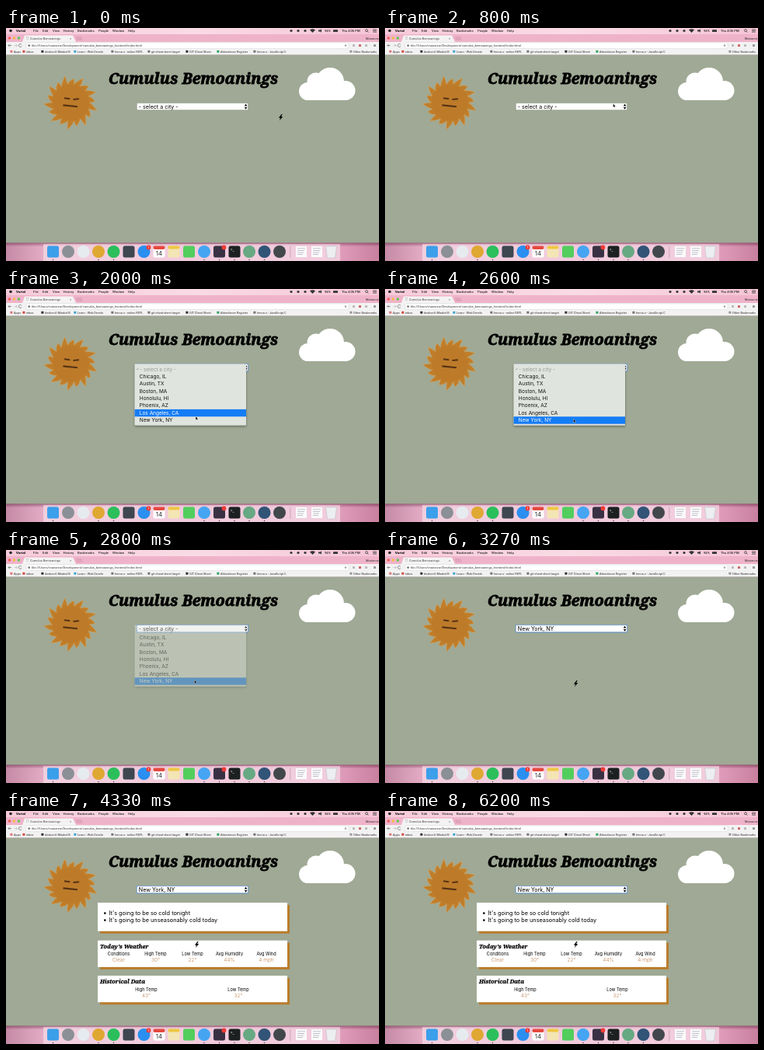
An HTML page for the animation above (6390 ms loop, 480 by 300 pixels).

```html
<!DOCTYPE html>
<html lang="en">
<head>
<meta charset="utf-8">
<title>Cumulus Bemoanings</title>
<style>
html, body { margin: 0; width: 100%; height: 100%; overflow: hidden; background: #9fa995; }
svg { display: block; width: 100vw; height: 100vh; }
text { font-family: Inter, "Open Sans", sans-serif; white-space: pre; }
.ui { font-family: Roboto, "Liberation Sans", sans-serif; }
.show { font-family: "Noto Serif", "DejaVu Serif", serif; font-weight: 900; font-style: italic; stroke: #000; }
</style>
</head>
<body>
<svg id="stage" viewBox="0 0 480 300">
  <defs>
    <linearGradient id="sky">
      <stop offset="0" stop-color="#c58aa5"/><stop offset=".12" stop-color="#e9b3ca"/>
      <stop offset=".5" stop-color="#e5a3c1"/><stop offset=".85" stop-color="#e9a9c6"/>
      <stop offset="1" stop-color="#c9809f"/>
    </linearGradient>
    <linearGradient id="bar">
      <stop offset="0" stop-color="#f6cad9"/><stop offset=".5" stop-color="#f9dbe5"/>
      <stop offset="1" stop-color="#f5c5d6"/>
    </linearGradient>
    <linearGradient id="shade" x2="0" y2="1">
      <stop offset="0" stop-color="#402" stop-opacity=".4"/><stop offset="1" stop-color="#402" stop-opacity="0"/>
    </linearGradient>
    <filter id="soft" x="-10%" y="-10%" width="120%" height="125%">
      <feDropShadow dx="0" dy="1.5" stdDeviation="1.6" flood-opacity=".4"/>
    </filter>
  </defs>
  <rect width="480" height="300" fill="url(#sky)"/>
  <g id="browser"></g>
  <g id="page"></g>
  <g id="dock"></g>
  <g id="cards"></g>
  <g id="select">
    <rect id="ring" x="167.6" y="96" width="144.6" height="10.4" rx="1.6" fill="#5b95dc"/>
    <rect x="168.5" y="96.8" width="142.8" height="8.8" rx="1" fill="#fff" stroke="#7d8579" stroke-width=".3"/>
    <text id="choice" x="170.8" y="103.8" font-size="7.1"></text>
    <path d="M306.8 100.5L308.6 97.7L310.4 100.5ZM306.8 102L308.6 104.8L310.4 102Z"/>
  </g>
  <g id="menu"></g>
  <path id="bolt" d="M.9-4L-2.6.7H-.4L-1.5 4.2L2.7-1H.5L2.2-4Z"/>
  <path id="arrow" d="M0 0V4.4L1.1 3.5L1.9 5L2.7 4.6L2 3.2H3.3Z" stroke="#fff" stroke-width=".35"/>
</svg>
<script>
const $ = id => document.getElementById(id);
const put = (id, ...parts) => $(id).insertAdjacentHTML('beforeend', parts.flat().join(''));
const rect = (x, y, w, h, fill, more = '') =>
  `<rect x="${x}" y="${y}" width="${w}" height="${h}" fill="${fill}" ${more}/>`;
const circle = (x, y, r, fill) => `<circle cx="${x}" cy="${y}" r="${r}" fill="${fill}"/>`;
const text = (x, y, size, str, more = '') => `<text x="${x}" y="${y}" font-size="${size}" ${more}>${str}</text>`;
const mid = 'text-anchor="middle"';
const ui = (x, y, size, str, more = '') => text(x, y, size, str, 'class="ui" ' + more);

// Menu bar, tabs, address and bookmarks
put('browser',
  rect(0, 0, 480, 8, 'url(#bar)'),
  circle(6, 3.5, 1.8, '#222'),
  ui(13, 4.9, 4.4, 'Vortal', 'font-weight="700"'),
  [[35, 'File'], [47, 'Edit'], [60, 'View'], [73.5, 'History'], [92, 'Bookmarks'], [119, 'People'], [137, 'Window'], [157, 'Help']]
    .map(([x, s]) => ui(x, 4.9, 4.3, s)),
  [367, 376, 385].map(x => circle(x, 3.5, 1.6, '#333')),
  '<path d="M391 2.6Q394.5-.2 398 2.6L394.5 6ZM402 2.6H405L406 1V6L405 4.6H402Z" fill="#333"/>',
  ui(410, 4.9, 4.2, '94%'),
  rect(421, 2.2, 6, 2.8, '#333', 'rx=".6"'),
  ui(432, 4.9, 4.2, 'Thu 4:06 PM'),
  '<g fill="none" stroke="#333" stroke-width=".7"><circle cx="464" cy="3.2" r="1.5"/><path d="M465.1 4.3L466.4 5.7M472 2H477M472 3.6H477M472 5.2H477"/></g>',
  rect(0, 8, 480, 10, '#efb3c9'),
  ['#f25e57', '#f5bd3f', '#5ac951'].map((c, i) => circle(4.5 + i * 6, 13, 1.7, c)),
  '<path d="M21 18L24 9.5H86L90 18Z" fill="#f4f3f4"/><path d="M91 16L89.5 11H97L99 16Z" fill="#e0a4ba"/>',
  rect(26.2, 11.2, 2.6, 3.4, '#fff', 'stroke="#999" stroke-width=".4"'),
  ui(31, 14.7, 4, 'Cumulus Bemoanings', 'fill="#444"'),
  ui(82, 14.7, 4.2, '×', 'fill="#555"'),
  ui(463, 14.7, 4, 'Marianne', 'fill="#333"'),
  rect(0, 18, 480, 16.6, '#f3f2f3'),
  rect(26, 18.9, 415, 7.4, '#fff', 'rx="1" stroke="#ccc" stroke-width=".4"'),
  '<g fill="none" stroke="#666" stroke-width=".7"><path d="M7 22.5H3M4.7 20.8L3 22.5L4.7 24.2M20 21.2A2 2 0 1 0 20.2 23.3"/><path d="M10.5 22.5H14.5M12.8 20.8L14.5 22.5L12.8 24.2" stroke="#bbb"/></g>',
  circle(29.7, 22.6, 1.4, '#777'),
  ui(33, 24.1, 4, 'file:///Users/marianne/Development/cumulus_bemoanings_frontend/index.html', 'fill="#333"'),
  circle(437, 22.6, 1.3, '#aaa'),
  [[446, '#bbb'], [454, '#c66'], [462, '#bbb'], [473, '#999']].map(([x, c]) => rect(x, 21, 3, 3, c, 'rx=".6"')),
  [[10, 'Apps', '#d77'], [26, 'inbox', '#d54a3f'], [50, 'deskcntl: Mirabel B', '#333'], [92, 'Learn - Web Develo', '#3ba6d0'],
   [140, 'fenno.x - online REPL', '#777'], [187, 'git-cheat-sheet target', '#777'], [236, 'GIT Cheat Sheet', '#333'],
   [276, 'Attendance Register', '#35a463'], [323, 'fenno.x - JavaScript C', '#777'], [447, 'Other Bookmarks', '#999']]
    .map(([x, s, c]) => rect(x - 4.6, 28.8, 3, 3, c, 'rx=".5"') + ui(x, 31.9, 3.9, s, 'fill="#333"')),
  rect(0, 34.3, 480, .4, '#bbb'));

// Page: sun, title, cloud
const polar = (r, a) => `${(r * Math.cos(a)).toFixed(2)} ${(r * Math.sin(a)).toFixed(2)}`;
const rays = 18, gap = 2 * Math.PI / rays;
let sun = 'M' + polar(24, 0);
for (let i = 0; i < rays; i++) {
  const a = i * gap, tip = i % 2 ? 31 : 35;
  sun += `Q${polar(28, a + .08)} ${polar(tip, a + .3)}Q${polar(28, a + .34)} ${polar(24, a + gap)}`;
}
put('page',
  rect(0, 34.6, 480, 242, '#9fa995'),
  `<g transform="translate(83.5 96)"><path d="${sun}Z" fill="#c07e2a" stroke="#d9a55c" stroke-width=".5"/>`,
  circle(0, 0, 23.5, '#bd7b2a') + '</g>',
  '<path d="M75 90.3L82.3 91.2M86.5 92L94 91.2M73.5 99.4L92 101.3" stroke="#573315" stroke-width="2.1"/>',
  text(241, 71.6, 19.8, 'Cumulus Bemoanings', `class="show" stroke-width=".8" ${mid}`),
  [[388.5, 81.5, 11.5], [399, 69, 11.5], [417, 69, 18], [437, 80.5, 12.5]].map(c => circle(...c, '#fff')),
  rect(388, 76, 49, 17, '#fff'));

// Dock
const badge = (x, fill, round) => round ? circle(x, 288, 8, fill) : rect(x - 7.5, 280.5, 15, 15, fill, 'rx="2.5"');
put('dock',
  rect(0, 276.5, 480, 5, 'url(#shade)'),
  rect(48, 278.3, 382, 22, '#f5dce6', 'opacity=".72"'),
  [[60.5, '#3c9fea'], [80, '#8b9096', 1], [99.5, '#e6ebf0', 1], [119, '#dfa832', 1], [138.5, '#2bbf5b', 1], [158, '#3e4650'],
   [177.5, '#2a8ff0', 1], [197, '#fff'], [216, '#f4e5b5'], [235.5, '#52ce5d'], [255, '#45a5f2', 1], [274.5, '#393143'],
   [294, '#1d2021'], [313, '#66a982', 1], [332.5, '#315477', 1], [352, '#42474c', 1]].map(d => badge(...d)),
  circle(183.5, 282.5, 2.9, '#ef3b36'),
  text(183.5, 284, 4, '1', `fill="#fff" ${mid}`),
  rect(189.5, 280.5, 15, 4.4, '#e5483f', 'rx="2"'),
  text(197, 293.3, 8, '14', `fill="#333" ${mid}`),
  rect(208.5, 280.5, 15, 4, '#efc743', 'rx="2"'),
  circle(280.5, 282.5, 2.9, '#ef3b36'),
  ui(289, 287.4, 4.6, '&gt;_', 'fill="#eee"'),
  rect(365.6, 281, .6, 15, '#b78a9d'),
  [380, 400].map(x => rect(x - 7, 281, 14, 14, '#fafafa') + [0, 1, 2, 3].map(i => rect(x - 5, 283.5 + i * 2.6, 10 - i, .7, '#aab')).join('')),
  '<path d="M411.5 281H425.5L423.5 296H413.5Z" fill="#eceef0" stroke="#b9b9be" stroke-width=".5"/>',
  [60.5, 119, 138.5, 255, 274.5, 294, 313, 332.5].map(x => circle(x, 298.4, .7, '#333')));

// Result cards
const card = (y, h) => rect(121, y + 3, 244, h, '#b97c2c') + rect(118, y, 244, h, '#fff');
const head = (y, s) => text(121, y, 7.3, s, 'class="show" stroke-width=".25"');
const stat = (x, y, label, value) =>
  text(x, y, 5.6, label, mid) + text(x, y + 8.2, 6.5, value, `fill="#bd8050" font-weight="300" ${mid}`);
put('cards',
  card(118, 36.7),
  ["It's going to be so cold tonight", "It's going to be unseasonably cold today"]
    .map((s, i) => circle(127.3, 131.6 + i * 9, 1.3, '#000') + text(132.5, 134.2 + i * 9, 7.3, s)),
  card(166.7, 34.2), head(177, "Today's Weather"),
  [[145, 'Conditions', 'Clear'], [192.5, 'High Temp', '30°'], [240, 'Low Temp', '22°'], [287.5, 'Avg Humidity', '44%'], [335, 'Avg Wind', '4 mph']]
    .map(([x, l, v]) => stat(x, 186, l, v)),
  card(212, 34.2), head(222.4, 'Historical Data'),
  stat(180.5, 231.8, 'High Temp', '43°'), stat(299, 231.8, 'Low Temp', '32°'));

// Open list
const cities = ['Chicago, IL', 'Austin, TX', 'Boston, MA', 'Honolulu, HI', 'Phoenix, AZ', 'Los Angeles, CA', 'New York, NY'];
const rowY = i => 103 + i * 9.43;
put('menu',
  rect(165.6, 96.4, 143.4, 79, '#e0e4de', 'rx="1" filter="url(#soft)"'),
  '<rect id="mark" x="165.6" width="143.4" height="9.4" fill="#147cf5"/>',
  '<path d="M168.2 103L169 104.2L170.4 101.6" fill="none" stroke="#8d918b" stroke-width=".6"/>',
  text(172.3, 105.5, 6.5, '- select a city -', 'fill="#969a94"'),
  cities.map((s, i) => text(171.8, rowY(i + 1) + 2.3, 6.5, s, 'class="city"')));
const rows = [...document.querySelectorAll('.city')];

// Pointer hotspot: time, x, y
const path = [[0, 350.5, 110.5], [70, 350.5, 110.5], [130, 311.5, 103], [400, 311.5, 103], [800, 293.5, 97.5],
  [1670, 293.5, 97.5], [2000, 244, 164], [2270, 242.5, 167.5], [6390, 242.5, 167.5]];
const pointer = t => {
  const i = path.findIndex(p => p[0] > t);
  const [t0, x0, y0] = path[i - 1], [t1, x1, y1] = path[i];
  const k = (1 - Math.cos(Math.PI * (t - t0) / (t1 - t0))) / 2;
  return [x0 + (x1 - x0) * k, y0 + (y1 - y0) * k];
};
const show = (id, on) => $(id).setAttribute('visibility', on ? 'visible' : 'hidden');
const opens = 1000, fades = 2670, closes = 2930, loads = 3400, loop = 6390;

function draw() {
  const t = performance.now() % loop;
  const [x, y] = pointer(t);
  const open = t >= opens && t < closes;
  const fade = t < fades ? 1 : Math.max(0, 1 - (t - fades) / 230);
  const blink = t >= 2530 && t < 2600;
  const row = open && !blink ? Math.round((y - 103) / 9.43) : 0;

  $('choice').textContent = t < closes ? '- select a city -' : 'New York, NY';
  show('ring', t >= opens);
  show('cards', t >= loads);
  $('menu').style.display = open ? '' : 'none';
  $('menu').setAttribute('opacity', fade);
  $('mark').setAttribute('y', rowY(row) - 4.7);
  $('mark').setAttribute('opacity', row > 0 ? 1 : 0);
  rows.forEach((r, i) => r.setAttribute('fill', i + 1 === row ? '#fff' : '#111'));

  const onSelect = x < 311 && y < 106;
  show('arrow', open || onSelect);
  show('bolt', !open && !onSelect);
  $('arrow').setAttribute('transform', `translate(${x} ${y})`);
  $('bolt').setAttribute('transform', `translate(${x + 3} ${y + 4.5})`);
  requestAnimationFrame(draw);
}
draw();
</script>
</body>
</html>
```
